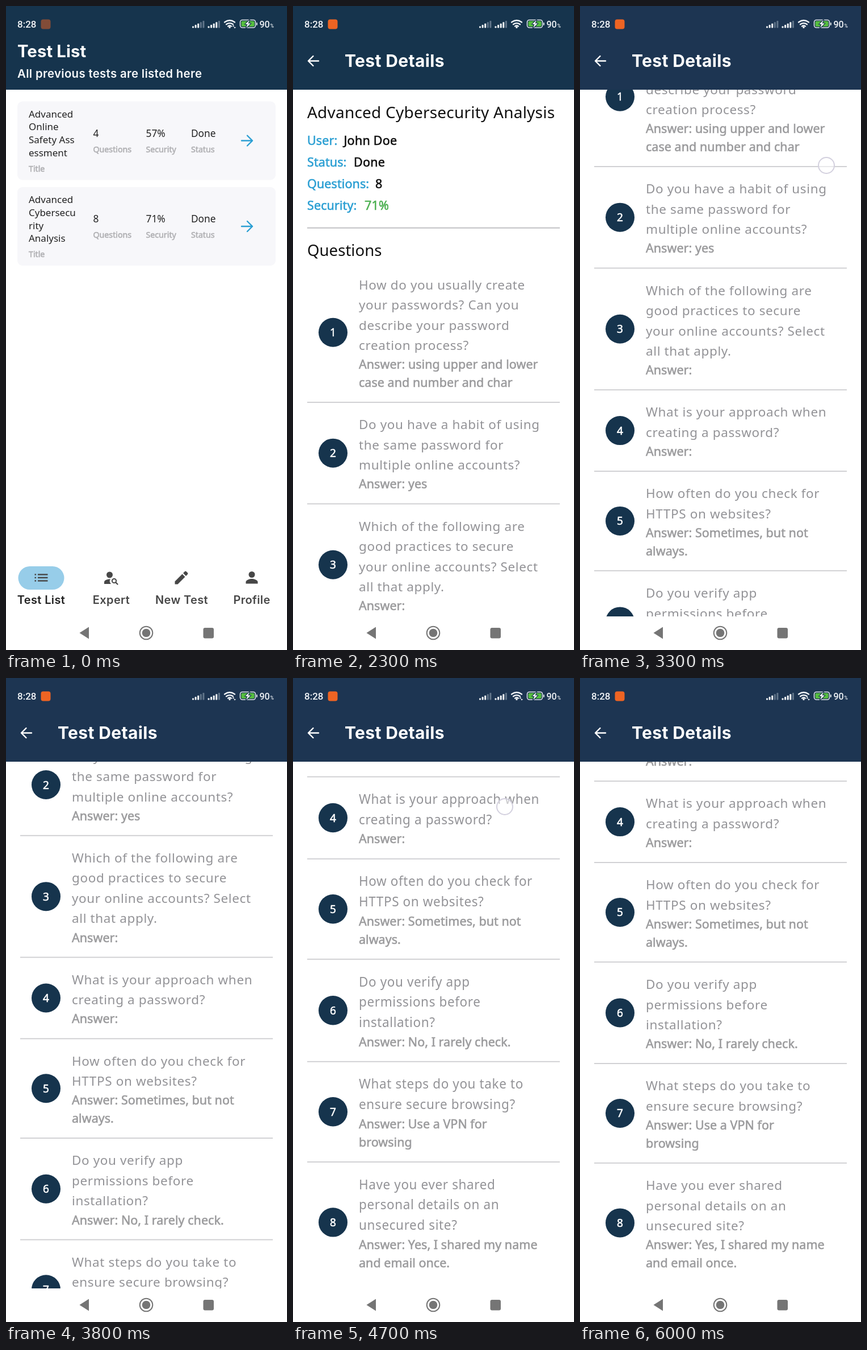
Write an HTML page that moves like this. It is 495 px wide and 1131 px high and loops after 6100 ms.

```html
<!DOCTYPE html>
<html lang="en">
<head>
<meta charset="utf-8">
<title>Test list</title>
<style>
  html, body { margin: 0; width: 100%; height: 100%; overflow: hidden; background: #fff; }
  svg { display: block; }
  text { font-family: "Noto Sans", sans-serif; white-space: pre; }
  .head { font-family: Inter, sans-serif; font-weight: 600; }
  .bold { font-weight: 700; }
  .bar { font-family: Roboto, sans-serif; font-weight: 500; fill: #f2f5f8; }
  .med { stroke: currentColor; stroke-width: .6px; fill: currentColor; }
  .mid { text-anchor: middle; }
  .line { fill: none; stroke-linecap: round; stroke-linejoin: round; }
</style>
</head>
<body>
<svg id="stage" width="495" height="1131" viewBox="0 0 495 1131"></svg>
<script>
const LOOP = 6100, NAVY = '#16344d', BLUE = '#2b9fd3', GREY = '#9b9b9d', MAX_SCROLL = 907;

const text = (x, y, size, color, str, cls = '', gap = 0) =>
  `<text x="${x}" y="${y}" font-size="${size}" fill="${color}" color="${color}" class="${cls}" letter-spacing="${gap}">${str}</text>`;
const rect = (x, y, w, h, fill, r = 0) =>
  `<rect x="${x}" y="${y}" width="${w}" height="${h}" rx="${r}" fill="${fill}"/>`;
const circle = (x, y, r, fill) => `<circle cx="${x}" cy="${y}" r="${r}" fill="${fill}"/>`;
const line = (d, color, width) => `<path class="line" d="${d}" stroke="${color}" stroke-width="${width}"/>`;
const shape = (d, fill) => `<path d="${d}" fill="${fill}"/>`;
const rule = (y, h) => rect(25, y - h / 2, 445, h, '#cdcdd0');

// Test list page
function card(y, title, count, score) {
  const field = (x, value, label) =>
    text(x, y + 62, 17.3, '#222', value) + text(x, y + 89, 14.2, '#b0b0b3', label, 'med');
  return rect(20, y, 455, 138, '#f7f7fa', 9) +
    title.map((s, i) => text(40, y + 28 + i * 22.8, 17, '#222', s)).join('') +
    text(40, y + 123, 14.2, '#b0b0b3', 'Title', 'med') +
    field(153.5, count, 'Questions') + field(246.5, score, 'Security') + field(326, 'Done', 'Status') +
    line(`M415 ${y + 69}h19m-9 -9l9 9l-9 9`, BLUE, 2.4);
}

function listPage() {
  const ink = '#474747';
  const bullets = [998.5, 1004, 1009.5].map(y =>
    rect(50.5, y - 1.2, 2.6, 2.4, ink) + rect(56, y - 1.2, 17.5, 2.4, ink)).join('');
  return rect(0, 0, 495, 1131, '#fff') + rect(0, 0, 495, 147, NAVY) +
    text(20, 90, 29.3, '#fff', 'Test List', 'head bold', .1) +
    text(20, 126, 20.4, '#f5f8fa', 'All previous tests are listed here', 'head', .32) +
    card(167.5, ['Advanced', 'Online', 'Safety Ass', 'essment'], '4', '57%') +
    card(318, ['Advanced', 'Cybersecu', 'rity', 'Analysis'], '8', '71%') +
    rect(21.5, 984, 81, 41, '#97cde9', 20.5) + bullets +
    circle(182.5, 999, 5.5, ink) +
    shape('M173 1015v-3c0-4 6-5.500 11-5.500q-3 4 1 8.500z', ink) +
    `<circle cx="190.500" cy="1009.500" r="3.600" fill="none" stroke="${ink}" stroke-width="2"/>` +
    line('M193.500 1012.500l3 3', ink, 2.2) +
    shape('M297.500 1015.500v-5l13-13l5 5l-13 13zM312 996l3-3q1.200-1 2.400 0l2.600 2.600q1 1.200 0 2.400l-3 3z', ink) +
    circle(433, 998.5, 5.5, ink) + shape('M422.500 1014.500v-3c0-3.500 7-5.500 10.500-5.500s10.500 2 10.500 5.500v3z', ink) +
    [['Test List', 62, '#222'], ['Expert', 185.5, ink], ['New Test', 309.5, ink], ['Profile', 433, ink]]
      .map(([s, x, c]) => text(x, 1050, 20, c, s, 'head mid', .35)).join('');
}

// Test details page
const questions = [
  ['How do you usually create|your passwords? Can you|describe your password|creation process?', 'using upper and lower|case and number and char'],
  ['Do you have a habit of using|the same password for|multiple online accounts?', 'yes'],
  ['Which of the following are|good practices to secure|your online accounts? Select|all that apply.', ''],
  ['What is your approach when|creating a password?', ''],
  ['How often do you check for|HTTPS on websites?', 'Sometimes, but not|always.'],
  ['Do you verify app|permissions before|installation?', 'No, I rarely check.'],
  ['What steps do you take to|ensure secure browsing?', 'Use a VPN for|browsing'],
  ['Have you ever shared|personal details on an|unsecured site?', 'Yes, I shared my name|and email once.']
];

function questionList(top) {
  const ASK = 35.45, REPLY = 31.8;
  return questions.map(([ask, reply], i) => {
    const asks = ask.split('|'), replies = ('Answer: ' + reply).split('|');
    const height = 40.2 + asks.length * ASK + replies.length * REPLY;
    const first = top + 47.3, answer = first + (asks.length - 1) * ASK + 33.2, mid = top + height / 2;
    top += height;
    return asks.map((s, k) => text(116, first + k * ASK, 22.5, '#939397', s, '', .62)).join('') +
      replies.map((s, k) => text(116, answer + k * REPLY, 21.5, GREY, s, 'med', .04)).join('') +
      circle(70.5, mid, 25.5, NAVY) + text(70.5, mid + 7, 19, '#fff', i + 1, 'mid med') +
      (i < questions.length - 1 ? rule(top, 1.8) : '');
  }).join('');
}

function detailPage() {
  const fact = (y, label, value, x, color) =>
    text(25, y, 21.5, BLUE, label, 'med', .1) + text(x, y, 21.5, color, value, 'med', .25);
  return rect(0, 0, 495, 1131, '#fff') + '<g id="scroll">' +
    text(25, 197, 28, '#111', 'Advanced Cybersecurity Analysis', '', .22) +
    fact(243.5, 'User:', 'John Doe', 89.5, '#111') + fact(281.5, 'Status:', 'Done', 107, '#111') +
    fact(319.5, 'Questions:', '8', 145, '#111') + fact(357.5, 'Security:', '71%', 126, '#4bb050') +
    rule(389.7, 2.6) + text(25, 438.5, 27.6, '#111', 'Questions') + questionList(450.4) + '</g>' +
    rect(0, 1072, 495, 59, '#fff') + `<rect id="header" width="495" height="147" fill="${NAVY}"/>` +
    line('M45 96.500h-18m8.500 -8.500l-8.500 8.500l8.500 8.500', '#fff', 2.4) +
    text(91, 106.5, 30, '#fff', 'Test Details', 'head bold', .35);
}

// System bars
function systemBars() {
  const signal = (x, lit) => [0, 1, 2, 3, 4].map(i =>
    rect(x + i * 4.6, 35.5 - i * 2.4, 3, 3 + i * 2.4, i < lit ? '#f2f5f8' : '#61758a', .8)).join('');
  const arc = (r, y) => line(`M${394 - r} ${y}q${r} ${-r * .72} ${2 * r} 0`, '#f2f5f8', 2.3);
  return text(20, 38, 17, '#fff', '8:28', 'bar') +
    '<g id="rec">' + rect(61.5, 23.5, 17, 17, '#ee6423', 4) + '</g>' +
    signal(328, 3) + signal(355.5, 4) +
    arc(9, 28.5) + arc(6, 32.3) + arc(3, 35.6) + circle(394, 37.5, 1.7, '#f2f5f8') +
    `<g id="traffic">${shape('M398.500 36l2-2.500l2 2.500zM401 37l2 2.500l2-2.500z', '#f2f5f8')}</g>` +
    '<rect x="412.500" y="24.500" width="27" height="13.500" rx="4" fill="none" stroke="#dfe6ea" stroke-width="1.600"/>' +
    rect(414.5, 26.5, 23, 9.5, '#55bd3f', 2) + rect(441, 29, 1.8, 5, '#dfe6ea', .9) +
    line('M429 24.500l-7.500 7.500h4l-2.500 6.500l8-8h-4.500z', NAVY, 2.4) +
    shape('M429 24.500l-7.500 7.500h4l-2.500 6.500l8-8h-4.500z', '#fff') +
    text(446.5, 37.5, 16, '#fff', '90', 'bar') + text(465.5, 37.5, 8.5, '#fff', '%', 'bar') +
    shape('M129.500 1101l16.500-10.500v21z', '#757575') +
    '<circle cx="247" cy="1101" r="11.300" fill="none" stroke="#757575" stroke-width="2"/>' +
    circle(247, 1101, 7.3, '#757575') + rect(347.5, 1092, 18.5, 18.5, '#757575', 3);
}

const $ = id => document.getElementById(id);
$('stage').innerHTML = listPage() + `<g id="detail">${detailPage()}</g>` + systemBars() +
  '<circle id="touch" r="14" fill="#fff" fill-opacity=".5" stroke="#d3d0de" stroke-width="2"/>';

// Piecewise linear value from [time, value] points
function at(t, points) {
  if (t <= points[0][0]) return points[0][1];
  for (let i = 1; i < points.length; i++) {
    const [a, u] = points[i - 1], [b, v] = points[i];
    if (t <= b) return u + (v - u) * (t - a) / (b - a);
  }
  return points[points.length - 1][1];
}
const easeOut = p => 1 - (1 - p) ** 3;

// Finger strokes: [x points, y points]
const tap = [[[500, 424]], [[500, 387], [700, 387]]];
const drag1 = [[[2400, 424], [2800, 428], [3300, 434]],
  [[2400, 683], [2500, 631], [2600, 569], [2700, 508], [2800, 453.5], [3000, 376], [3300, 280], [3500, 211]]];
const drag2 = [[[4100, 316], [4300, 333], [4700, 373]],
  [[4100, 600], [4200, 540], [4300, 459], [4500, 318], [4700, 226], [4800, 210]]];

function scrollAt(t) {
  if (t < 2400) return 0;
  if (t <= 3500) return 694 - at(t, drag1[1]);
  if (t < 4100) return 483 + 131 * easeOut((t - 3500) / 600);
  return 1214 - at(t, drag2[1]);
}

function draw(t) {
  const open = Math.min(1, Math.max(0, (t - 700) / 300));
  const zoom = .9 + .1 * easeOut(open);
  $('detail').setAttribute('opacity', open);
  $('detail').setAttribute('transform', `translate(247.500 565.500) scale(${zoom}) translate(-247.500 -565.500)`);

  const pull = scrollAt(t), scroll = Math.min(pull, MAX_SCROLL);
  const release = at(t, [[4800, 1], [5100, 0]]);
  const stretch = 1 + Math.max(0, pull - MAX_SCROLL) * .000106 * release;
  $('scroll').setAttribute('transform', `translate(0 1072) scale(1 ${stretch}) translate(0 ${-1072 - scroll})`);
  $('header').setAttribute('fill', scroll > 0 ? '#1d3552' : NAVY);

  $('rec').setAttribute('opacity', at(t, [[0, .5], [300, 1]]));
  $('traffic').setAttribute('opacity', t < 1500 || t >= 3700 ? 1 : 0);

  const stroke = [tap, drag1, drag2].find(([, ys]) => t >= ys[0][0] && t <= ys[ys.length - 1][0]);
  $('touch').setAttribute('opacity', stroke ? 1 : 0);
  if (stroke) {
    $('touch').setAttribute('cx', at(t, stroke[0]));
    $('touch').setAttribute('cy', at(t, stroke[1]));
  }
}

const start = performance.now();
function tick() {
  // The picture advances ten times a second
  draw(Math.floor((performance.now() - start) % LOOP / 100) * 100);
  requestAnimationFrame(tick);
}
tick();
</script>
</body>
</html>
```
